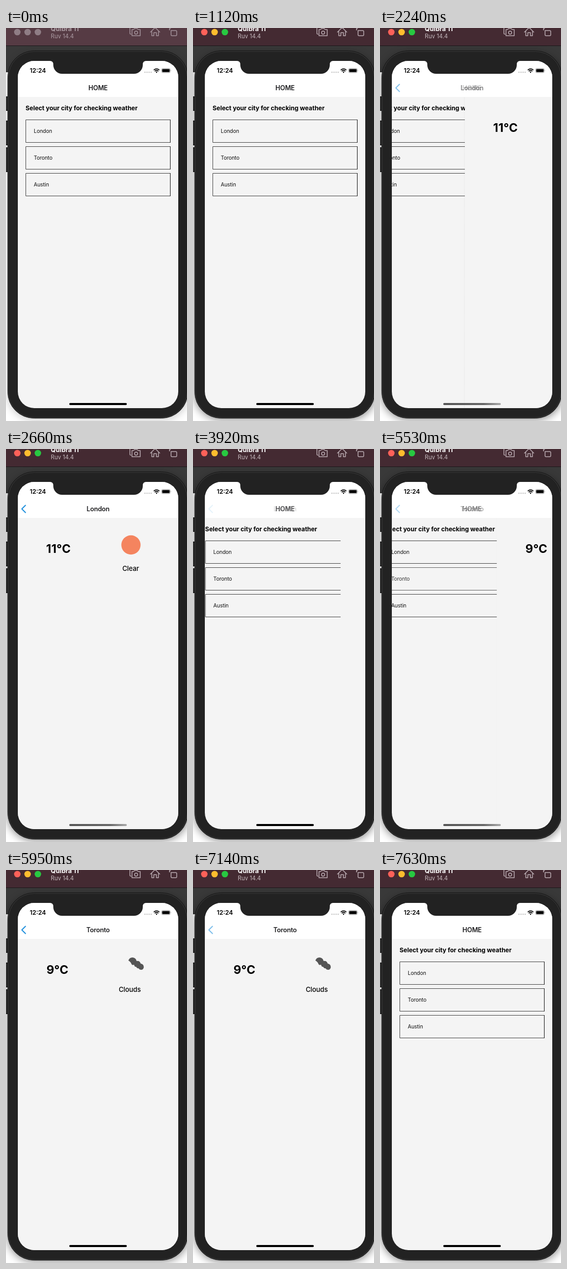
An HTML page that plays this animation: 352x764 px, repeating every 8000 ms.

```html
<!DOCTYPE html>
<html lang="en">
<head>
<meta charset="utf-8">
<title>City weather</title>
<style>
  html, body { margin: 0; width: 100%; height: 100%; overflow: hidden; background: #fff; }
  svg { display: block; width: 352px; height: 764px; font-family: Inter, "Open Sans", sans-serif; }
  .head { font-size: 12.5px; font-weight: 600; letter-spacing: -.18px; text-anchor: middle; fill: #1c1c1e; }
  .ask { font-size: 12px; font-weight: 700; letter-spacing: -.03px; }
  .row text { font-size: 10.2px; letter-spacing: -.12px; fill: #111; }
  .temp { font-size: 23px; font-weight: 700; letter-spacing: .2px; text-anchor: middle; }
  .sky { font-size: 13px; font-weight: 500; letter-spacing: -.1px; text-anchor: middle; }
  .line { fill: none; stroke-linecap: round; stroke-linejoin: round; }
</style>
</head>
<body>
<svg viewBox="0 0 352 764">
  <defs>
    <clipPath id="screen"><rect x="23" y="64" width="312" height="675" rx="32"/></clipPath>
    <clipPath id="body"><rect x="23" y="134" width="312" height="605"/></clipPath>
    <filter id="blur" x="-20%" y="-20%" width="140%" height="140%"><feGaussianBlur stdDeviation="9"/></filter>
    <linearGradient id="edge">
      <stop offset="0" stop-opacity="0"/>
      <stop offset="1" stop-opacity=".1"/>
    </linearGradient>
    <linearGradient id="dim">
      <stop offset="0" stop-color="#555"/>
      <stop offset=".7" stop-color="#666"/>
      <stop offset="1" stop-color="#aaa"/>
    </linearGradient>
  </defs>

  <!-- desktop -->
  <rect width="352" height="764" fill="#fff"/>
  <rect y="33" width="352" height="53" fill="#393939"/>
  <rect id="shade" x="4" y="52" width="350" height="708" rx="51" filter="url(#blur)"/>
  <rect id="bar" width="352" height="34"/>
  <rect y="34" width="352" height="1" fill="#1d1619"/>
  <g id="lights">
    <circle cx="22" cy="8" r="6.3"/><circle cx="42" cy="8" r="6.3"/><circle cx="62" cy="8" r="6.3"/>
  </g>
  <text id="name" x="87" y="6" font-size="12.5" font-weight="700">Quibra 11</text>
  <text id="sub" x="87" y="20" font-size="11.2">Ruv 14.4</text>
  <g id="tools" class="line" stroke-width="1.5">
    <path d="M241-2V10q0 2 2 2M245 3h3l2-2h5l2 2h4v12h-16z"/>
    <circle cx="253" cy="9" r="3"/>
    <path d="M281 8l9-9 9 9M283.5 7v8h4v-6h5v6h4v-8"/>
    <path d="M321 5h9q2 0 2 2v6q0 2-2 2h-7q-2 0-2-2zM318 4q0-5 6-5h5M318 4v-3"/>
  </g>

  <!-- phone -->
  <g fill="#303030" stroke="#111">
    <rect x="-2" y="133.5" width="7" height="27"/>
    <rect x="-2" y="180.5" width="7" height="47"/>
    <rect x="-2" y="232.5" width="7" height="47"/>
  </g>
  <rect x="3.5" y="44.5" width="350" height="714" rx="51" fill="#222" stroke="#0c0c0c"/>
  <rect x="4.5" y="45.5" width="348" height="712" rx="50" fill="none" stroke="#484848" stroke-width=".8"/>

  <g clip-path="url(#screen)">
    <rect x="23" y="64" width="312" height="675" fill="#f4f4f4"/>
    <g clip-path="url(#body)">
      <g id="home">
        <text class="ask" x="38" y="160">Select your city for checking weather</text>
      </g>
      <g id="detail">
        <rect id="rim" x="20" y="134" width="3" height="605" fill="url(#edge)"/>
        <rect x="23" y="134" width="312" height="605" fill="#f4f4f4"/>
        <g class="city">
          <text class="temp" x="102" y="202">11°C</text>
          <circle cx="243" cy="186.5" r="18.7" fill="#f4845f"/>
          <text class="sky" x="242.4" y="237">Clear</text>
        </g>
        <g class="city">
          <text class="temp" x="100" y="202">9°C</text>
          <path fill="#555" d="M238 176q2-6 8-6 7 1 8 7 6-1 8 5 6 1 6 7-1 5-5 5-4 0-5-3-3 1-5-3-3 1-4-4-3 2-5-1-1-4-6-7z"/>
          <text class="sky" x="240.6" y="237">Clouds</text>
        </g>
      </g>
    </g>
    <rect x="23" y="64" width="312" height="70" fill="#fff"/>
    <text id="titleA" class="head" x="179" y="121.3">HOME</text>
    <text id="titleB" class="head" x="179" y="121.3"></text>
    <path id="back" class="line" d="M37.8 109.6l-7 7 7 7" stroke="#2492dd" stroke-width="2.1"/>
    <rect id="grip" x="123" y="729" width="112" height="4" rx="2"/>

    <!-- status bar -->
    <text x="46.2" y="87" font-size="12" font-weight="600">12:24</text>
    <g fill="#c4c4c4">
      <circle cx="270.3" cy="86" r="1.3"/><circle cx="274.3" cy="86" r="1.3"/>
      <circle cx="278.3" cy="86" r="1.3"/><circle cx="282.3" cy="86" r="1.3"/>
    </g>
    <g class="line" stroke="#000" stroke-width="1.7">
      <path d="M287.8 81.3q5-4 10 0M289.8 83.7q3-2.4 6 0"/>
      <circle cx="292.8" cy="86" r=".5"/>
    </g>
    <rect x="302.5" y="78.5" width="17" height="8.5" rx="2.5" fill="none" stroke="#999" stroke-width=".8"/>
    <rect x="303.7" y="79.7" width="14.6" height="6.1" rx="1.4"/>
    <path d="M320.6 81.2q1.5 1.5 0 3z" fill="#999"/>
  </g>
  <path fill="#222" d="M86 63v1a6 6 0 0 1 6 6v2a17 17 0 0 0 17 17h140a17 17 0 0 0 17-17v-2a6 6 0 0 1 6-6v-1z"/>
</svg>

<script>
const LOOP = 8000, TICK = 70, WIDTH = 312;
const cities = ["London", "Toronto", "Austin"];
const moves = [
  { at: 2140, city: 0, open: true },
  { at: 3737, city: 0 },
  { at: 5463, city: 1, open: true },
  { at: 7140, city: 1 }
];
const presses = [
  [[1800, 1], [1820, .2], [1930, .2], [2180, 1]],
  [[5130, 1], [5250, .2], [5390, .2], [5570, 1]],
  [[0, 1]]
];
const backPress = [[3620, 1], [3700, .2], [3750, .2], [4000, 1], [7060, 1], [7210, .2], [7300, .2], [7550, 1]];
const dimmed = [[2100, 3700], [5460, 5950]];
const gray = ["#8f7d85", "#8f7d85", "#8f7d85"];
const bright = ["#ff6159", "#ffbd2e", "#28c941"];

const $ = id => document.getElementById(id);
const set = (el, name, value) => el.setAttribute(name, value);

cities.forEach((city, i) => {
  const y = 178.5 + i * 52;
  $("home").insertAdjacentHTML("beforeend", `<g class="row">
    <path class="line" stroke="#444" d="M319.5 ${y}H38.5v44H319.5"/>
    <path class="line" stroke="#111" d="M319.5 ${y}v44"/>
    <text x="54" y="${y + 25.8}">${city}</text></g>`);
});
const rows = document.querySelectorAll(".row");
const panels = document.querySelectorAll(".city");
const lights = $("lights").children;

// Critically damped spring, cut off once it has settled
function spring(ms) {
  const z = ms * Math.sqrt(1000 / 3) / 1000;
  return ms >= 485 ? 1 : 1 - Math.exp(-z) * (1 + z);
}

function track(t, keys) {
  const i = keys.findIndex(k => k[0] > t);
  if (i < 0) return keys[keys.length - 1][1];
  if (i === 0) return keys[0][1];
  const [t0, a] = keys[i - 1], [t1, b] = keys[i];
  return a + (b - a) * (t - t0) / (t1 - t0);
}

function paintWindow(active) {
  set($("bar"), "fill", active ? "#442a32" : "#563b44");
  set($("shade"), "opacity", active ? .55 : .25);
  set($("name"), "fill", active ? "#fff" : "#ab9ba2");
  set($("sub"), "fill", active ? "#c3b7bc" : "#ab9ba2");
  set($("tools"), "stroke", active ? "#b9abb1" : "#a3929a");
  (active ? bright : gray).forEach((c, i) => set(lights[i], "fill", c));
}

function draw(t) {
  const move = moves.filter(m => m.at <= t).pop();
  const s = move ? spring(t - move.at) : 0;
  const p = move && !move.open ? 1 - s : s;
  const city = move ? move.city : 0;

  paintWindow(t >= 1120);
  set($("home"), "transform", `translate(${-.3 * WIDTH * p})`);
  set($("detail"), "transform", `translate(${WIDTH * (1 - p)})`);
  set($("detail"), "visibility", p > 0 ? "visible" : "hidden");
  set($("rim"), "opacity", p * p);
  panels.forEach((el, i) => set(el, "display", i === city ? "inline" : "none"));
  rows.forEach((el, i) => set(el, "opacity", track(t, presses[i])));
  $("titleB").textContent = cities[city];
  set($("titleA"), "opacity", Math.max(0, 1 - 1.4 * p));
  set($("titleB"), "opacity", p);
  set($("back"), "opacity", p * track(t, backPress));
  set($("grip"), "fill", dimmed.some(([a, b]) => t >= a && t < b) ? "url(#dim)" : "#000");
}

const start = performance.now();
function frame(now) {
  const t = Math.max(0, now - start) % LOOP;
  draw(Math.floor(t / TICK) * TICK);
  requestAnimationFrame(frame);
}
draw(0);
requestAnimationFrame(frame);
</script>
</body>
</html>
```
